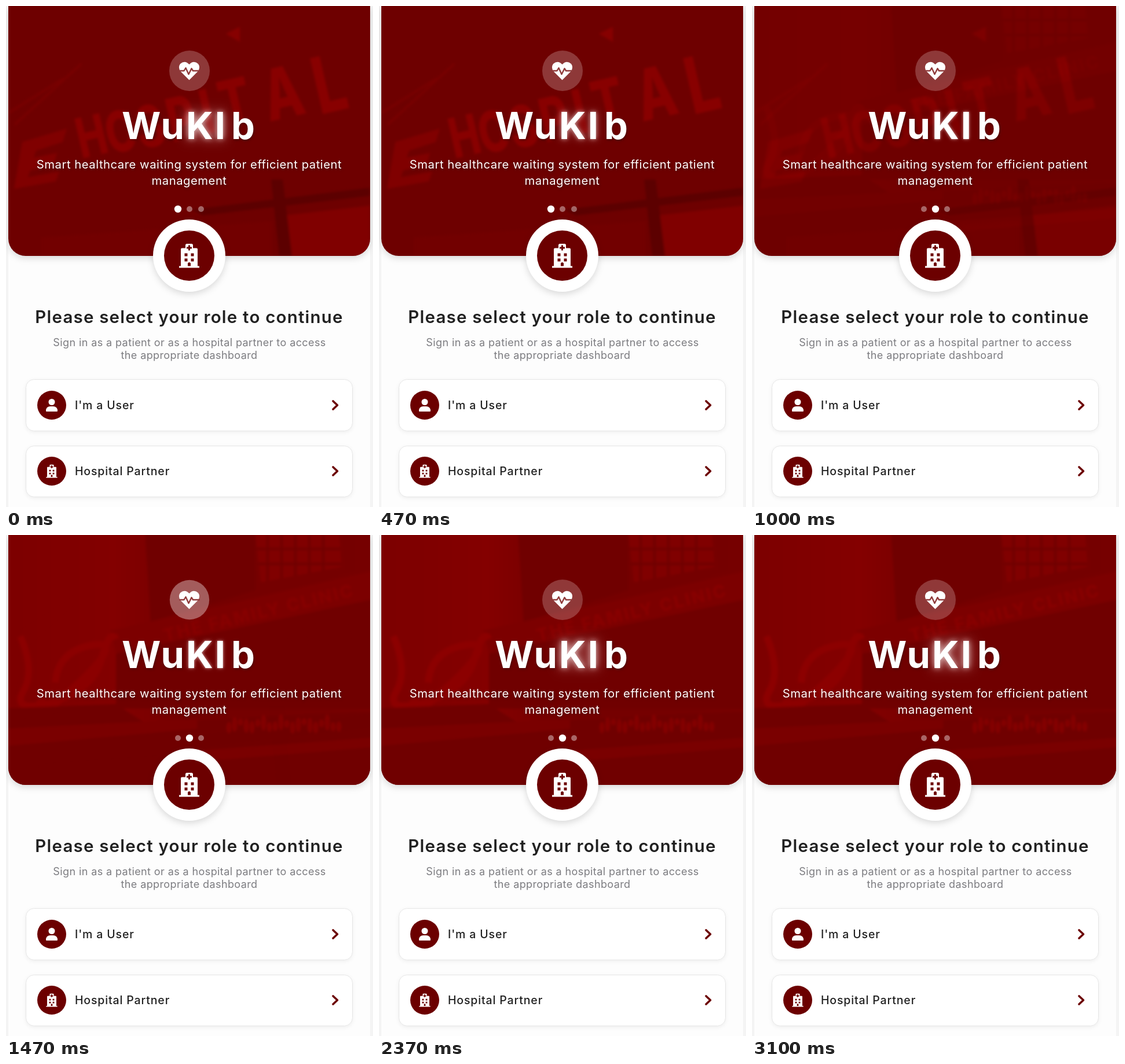
Write an HTML page that moves like this. It is 634 px wide and 866 px high and loops after 3.13 s.

```html
<!DOCTYPE html>
<html lang="en">
<head>
<meta charset="utf-8">
<title>Role selection</title>
<style>
  html, body { margin: 0; width: 100%; height: 100%; overflow: hidden; background: #f4f4f4; }
  svg { display: block; font-family: Inter, sans-serif; }
  .title { font-size: 65px; font-weight: 700; fill: #fff; }
  .lead { font-size: 20.3px; letter-spacing: .5px; fill: #fff; }
  .head { font-size: 29.5px; font-weight: 600; letter-spacing: 1.2px; fill: #212121; }
  .note { font-size: 18px; letter-spacing: .4px; fill: #7c7c80; }
  .label { font-size: 19.5px; font-weight: 500; letter-spacing: .85px; fill: #212121; }
  .mid { text-anchor: middle; }
  .soft { filter: drop-shadow(0 4px 6px rgba(0, 0, 0, .14)); }
  .dark { filter: drop-shadow(1px 2px 2px rgba(40, 0, 0, .5)); }
  .card { fill: #fff; stroke: #e6e6e6; filter: drop-shadow(0 2px 3px rgba(0, 0, 0, .06)); }
  .sign { font-weight: 800; fill: #880000; }
</style>
</head>
<body>
<svg width="634" height="866" viewBox="0 0 634 866">
  <defs>
    <clipPath id="hero"><path d="M4 0H629V402a30 30 0 0 1-30 30H34a30 30 0 0 1-30-30Z"/></clipPath>
    <filter id="blur"><feGaussianBlur stdDeviation="2"/></filter>
    <linearGradient id="sky">
      <stop offset="0" stop-color="#7c0000"/><stop offset=".3" stop-color="#840000"/>
      <stop offset=".5" stop-color="#740000"/><stop offset="1" stop-color="#760000"/>
    </linearGradient>
    <g id="hospital">
      <path fill="#fff" d="M-14.500-11q0-2 2-2h6v-5q0-2.500 2.500-2.500h8q2.500 0 2.500 2.500v5h6q2 0 2 2v29h3v3h-35v-3h3Z"/>
      <path fill="#6c0000" d="M-1.500-18h3v3h3v3h-3v3h-3v-3h-3v-3h3ZM-8-4h5v5h-5ZM3-4h5v5h-5ZM-8 5h5v5h-5ZM3 5h5v5h-5ZM-2.500 18v-5q2.500-3 5 0v5Z"/>
    </g>
    <path id="chevron" d="M-4-7 3.500 0-4 7" fill="none" stroke="#6c0000" stroke-width="3.600" stroke-linecap="round" stroke-linejoin="round"/>
  </defs>

  <rect x="4" width="625" height="866" fill="#fdfdfd"/>

  <g class="soft"><g clip-path="url(#hero)">
    <rect width="634" height="432" fill="#6e0000"/>
    <g filter="url(#blur)">
      <path d="M15 205 130 100M4 185 100 125" stroke="#780000" stroke-width="4"/>
      <path d="M380 48 404 36V62Z" fill="#860000"/>
      <path d="M28 235 105 212 98 235 52 250 48 262 88 254 82 276 42 284 38 296 92 286 86 303 14 316Z" fill="#800000"/>
      <g id="letters" class="sign"></g>
      <path d="M480 362 629 345V432H490Z" fill="#800000"/>
      <path d="M320 352 629 314V328L340 362ZM458 300h20l16 132h-22Z" fill="#5c0000"/>
      <path d="M60 400 460 372V432H60Z" fill="#720000"/>
    </g>
    <g id="street" filter="url(#blur)">
      <rect x="-10" y="-10" width="654" height="452" fill="url(#sky)"/>
      <path d="M240-10H430V95L250 150Z" fill="#700000"/>
      <path d="M430-10H575L580 55 440 82Z" fill="#800000"/>
      <path d="M452 0V80M476 0V76M500 0V72M524 0V67M548 0V62M432 24H578M435 50H580" stroke="#700000" stroke-width="4"/>
      <path d="M180 165 640 60V112L190 205Z" fill="#7c0000"/>
      <path d="M190 205 640 110V300H190Z" fill="#6f0000"/>
      <text class="sign" transform="translate(275 184) rotate(-13.500)" font-size="30" letter-spacing="3">THE FAMILY CLINIC</text>
      <path d="M25 175Q50 235 30 270T70 292Q150 270 165 215T190 180M85 255Q90 200 150 190T110 270 65 280" fill="none" stroke="#8c0000" stroke-width="12"/>
      <path d="M-6 300 190 292 240 325 640 305V442H-6Z" fill="#700000"/>
      <path d="M-6 335 330 318V335L-6 365ZM300 375 640 350V366L330 392Z" fill="#7a0000"/>
      <g id="crowd" fill="#840000"></g>
    </g>
  </g></g>

  <circle id="badge" cx="317" cy="112" fill="#fff"/>
  <path fill="#fff" d="M316.500 128 301.500 113Q296.500 106 301 100 309 93 316.500 101 324 93 332 100 336.500 106 331.500 113Z"/>
  <path d="M299 112h8.500l3-5 5 11 5-10 2.500 4H335" fill="none" stroke="#913c3c" stroke-width="2.400" stroke-linejoin="round"/>

  <g class="title dark"><text x="200" y="230">Wu</text><text x="389" y="230">b</text></g>
  <text id="glow" class="title" x="311" y="230" letter-spacing="3">KI</text>
  <g class="lead mid dark">
    <text x="316.500" y="281">Smart healthcare waiting system for efficient patient</text>
    <text x="316.500" y="309">management</text>
  </g>
  <g id="dots" fill="#fff"></g>

  <circle class="soft" cx="316.500" cy="431.500" r="62.500" fill="#fff"/>
  <circle cx="316.500" cy="431.500" r="43.500" fill="#6c0000"/>
  <use href="#hospital" x="316.500" y="431.500"/>

  <text class="head mid" x="316.500" y="548">Please select your role to continue</text>
  <g class="note mid">
    <text x="317" y="588">Sign in as a patient or as a hospital partner to access</text>
    <text x="316.500" y="610">the appropriate dashboard</text>
  </g>

  <rect class="card" x="34.500" y="645.500" width="564" height="89" rx="14"/>
  <rect class="card" x="34.500" y="760.500" width="564" height="88" rx="14"/>
  <g fill="#6c0000"><circle cx="79" cy="690" r="25"/><circle cx="79" cy="804" r="25"/></g>
  <g fill="#fff"><circle cx="79" cy="684.500" r="5.500"/><path d="M69 700q0-8 8-8h4q8 0 8 8 0 1-1 1H70q-1 0-1-1Z"/></g>
  <use href="#hospital" transform="translate(79 804) scale(.55)"/>
  <text class="label" x="119" y="697">I'm a User</text>
  <text class="label" x="119" y="811">Hospital Partner</text>
  <use href="#chevron" x="569" y="690"/><use href="#chevron" x="569" y="804"/>
</svg>
<script>
  const $ = id => document.getElementById(id);
  const LOOP = 3130, SWITCH = 560;
  const mix = (a, b, k) => a + (b - a) * k;
  const smooth = v => { v = Math.max(0, Math.min(1, v)); return v * v * (3 - 2 * v); };

  // Sign lettering grows towards the right: glyph, x, baseline, size
  $('letters').innerHTML = [
    ['H', 130, 264, 96], ['O', 180, 257, 98], ['S', 234, 248, 100], ['P', 287, 236, 104],
    ['I', 345, 222, 106], ['T', 378, 212, 112], ['A', 455, 200, 122], ['L', 542, 188, 136]
  ].map(([c, x, y, s]) =>
    `<text transform="translate(${x} ${y}) rotate(-13) scale(.72 1)" font-size="${s}">${c}</text>`).join('');

  $('crowd').innerHTML = Array.from({ length: 20 }, (_, i) =>
    `<ellipse cx="${385 + i * 10}" cy="${328 + 5 * Math.cos(i * 1.7)}" rx="4" ry="${10 + 4 * Math.sin(i * 2.3)}"/>`).join('');

  $('dots').innerHTML = [297, 317, 337].map(x => `<circle cx="${x}" cy="351"/>`).join('');
  const dots = [...$('dots').children];

  function draw() {
    const t = performance.now() % LOOP;
    $('street').setAttribute('opacity', smooth((t - SWITCH) / 1000));

    const moved = smooth((t - SWITCH) / 200);
    [1 - moved, moved, 0].forEach((on, i) => {
      dots[i].setAttribute('r', mix(5, 6.2, on));
      dots[i].setAttribute('opacity', mix(.4, 1, on));
    });

    const beat = Math.exp(-(((t - 1470) / 220) ** 2));
    $('badge').setAttribute('opacity', mix(.22, .36, beat));
    $('badge').setAttribute('r', mix(35, 34.2, beat));

    const g = .5 - .5 * Math.cos((t - 1150) / LOOP * 2 * Math.PI);
    $('glow').style.filter =
      `drop-shadow(0 0 ${mix(2, 5, g)}px rgba(255,255,255,${mix(.45, .65, g)})) ` +
      `drop-shadow(0 0 ${mix(3, 11, g)}px rgba(255,225,225,${mix(.25, .65, g)}))`;
    requestAnimationFrame(draw);
  }
  draw();
</script>
</body>
</html>
```
